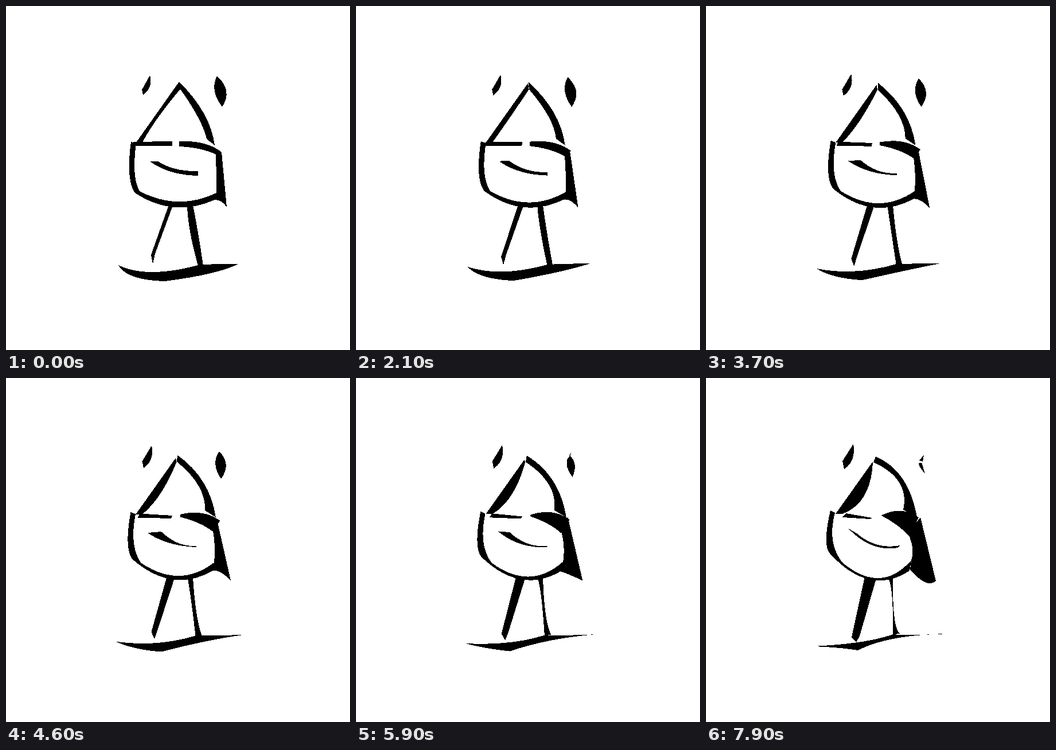
An HTML page for the animation above (8000 ms loop, 600 by 600 pixels).

```html
<!DOCTYPE html>
<html lang="en">
<head>
<meta charset="utf-8">
<title>Ink figure</title>
<style>
html, body { margin: 0; width: 100%; height: 100%; overflow: hidden; background: #fff; }
svg { display: block; width: 100%; height: 100%; }
</style>
</head>
<body>
<svg id="stage" viewBox="0 0 600 600" shape-rendering="crispEdges"></svg>
<script>
const LOOP = 8000, STEP = 100, END = LOOP - STEP;
const stage = document.getElementById("stage");
const parts = [];

// Each pose is a path with the same commands; numbers blend from pose to pose.
function part(...paths) {
  const node = document.createElementNS("http://www.w3.org/2000/svg", "path");
  stage.append(node);
  parts.push({ node, outline: paths[0], poses: paths.map(s => s.match(/\d+/g).map(Number)) });
}

// leaves
part("M251 121Q257 142 239 155L237 146Z",
     "M257 115Q262 145 241 159L238 145Z");
part("M368 122Q396 147 377 176Q355 147 368 122Z",
     "M372 128Q394 150 375 176Q357 149 372 128Z",
     "M376 148Q377 150 382 167Q364 146 376 148Z");
part("M368 122L368 122L368 122Z",
     "M372 129L372 129L372 129Z",
     "M372 144L380 134L378 146Z");

// hat
part("M227 238L302 132L304 145Q257 201 238 238Z",
     "M226 237L290 147L291 148Q287 219 238 237Z");
part("M302 132Q357 187 364 243L350 232Q343 200 304 145Z",
     "M296 137Q354 162 368 243L344 230Q356 176 292 147Z");

// brows
part("M222 237L290 236L290 244L222 244Z",
     "M244 236L290 244L286 246L238 243Z");
part("M302 236Q350 234 376 255L366 259Q342 247 302 245Z",
     "M305 240Q340 222 371 243L354 276Q337 256 306 240Z");

// right flank
part("M366 257L376 255L385 351Q377 338 364 338L367 325Q367 290 366 257Z",
     "M360 262L367 243L392 353Q368 329 354 338L363 322Q366 290 360 262Z",
     "M352 270L374 243L401 354Q385 368 356 334L358 318Q365 298 352 270Z");

// bowl
part("M218 237Q209 303 225 326Q292 370 364 338L367 326Q300 358 233 323Q219 298 227 240Z",
     "M217 231Q203 291 216 306Q285 382 355 336L358 318Q305 378 238 322Q211 288 225 235Z");

// mouth
part("M251 271L265 271Q293 289 335 288L335 296Q284 295 251 271Z",
     "M247 270L271 268Q299 295 332 293L332 295Q280 293 247 270Z",
     "M249 263L263 271Q297 300 338 292L335 296Q288 304 249 263Z");

// legs
part("M284 347L291 348L260 432L256 450L253 434Z",
     "M277 346L296 353L268 450L262 461L254 452Z");
part("M316 347Q317 390 335 453L344 453Q336 398 326 347Z",
     "M317 349Q327 360 326 447L339 446Q325 440 326 348Z");

// ground
part("M196 452Q245 476 335 452Q370 449 405 450Q370 468 277 480Q210 478 196 452Z",
     "M188 468Q283 463 326 447Q350 450 421 446Q317 448 265 475Q236 470 188 468Z");

function draw(time) {
  const t = Math.floor(time % LOOP / STEP) * STEP;
  const progress = (t / END) ** 1.3;
  for (const { node, outline, poses } of parts) {
    const place = progress * (poses.length - 1);
    const k = Math.min(Math.floor(place), poses.length - 2);
    let i = 0;
    node.setAttribute("d", outline.replace(/\d+/g, () => {
      const from = poses[k][i], to = poses[k + 1][i++];
      return (from + (to - from) * (place - k)).toFixed(2);
    }));
  }
}

const start = performance.now();
function tick() {
  draw(performance.now() - start);
  requestAnimationFrame(tick);
}
tick();
</script>
</body>
</html>
```
